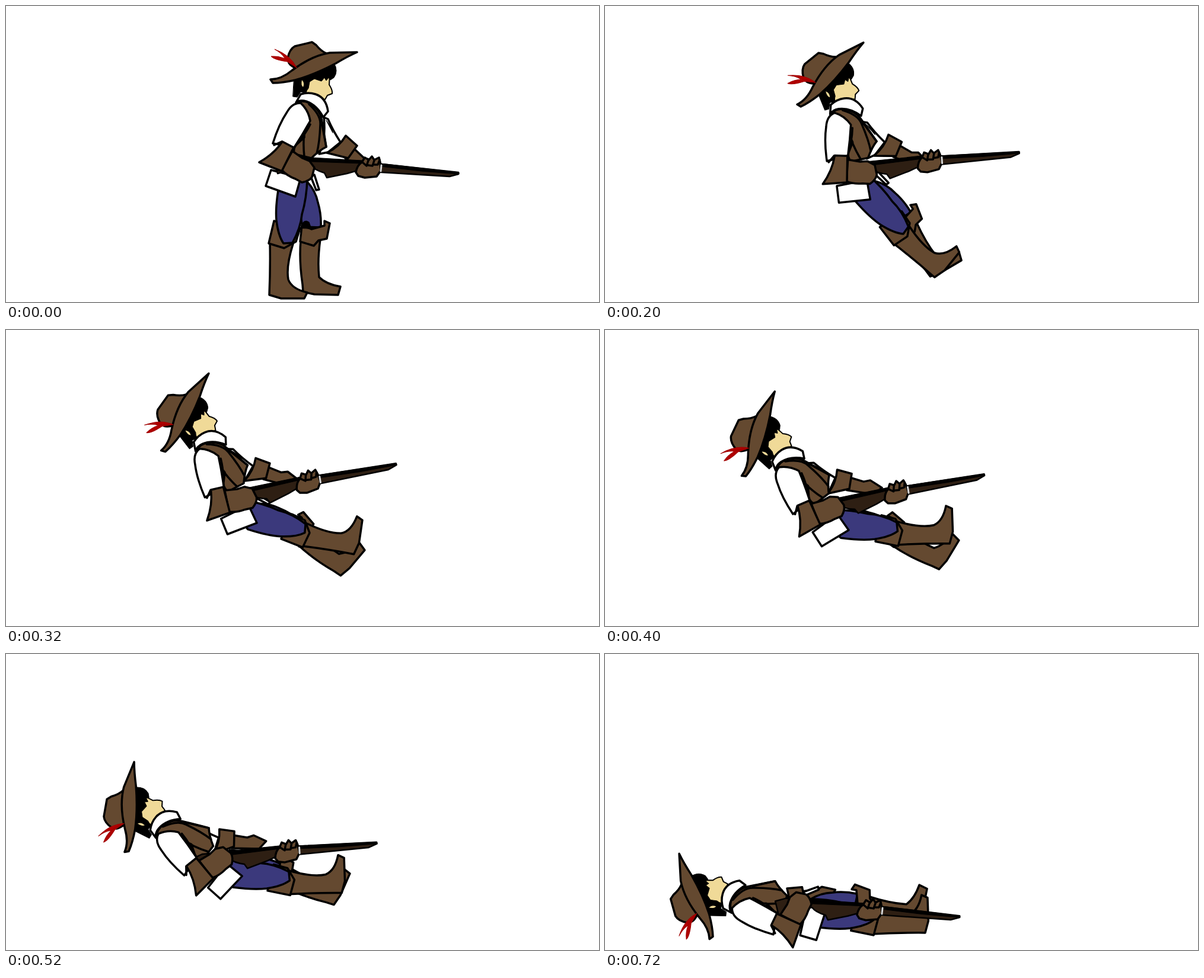
These frames come from a looping animation (1000 px wide and 500 px high, 1440 ms). An HTML page:

```html
<!DOCTYPE html>
<html lang="en">
<head>
<meta charset="utf-8">
<title>Falling musketeer</title>
<style>
html, body { margin: 0; width: 100%; height: 100%; overflow: hidden; background: #fff; }
svg { display: block; width: 1000px; height: 500px; }
path { stroke: #000; stroke-width: 3.5; stroke-linejoin: round; stroke-linecap: round; }
.brown { fill: #644930; }
.blue { fill: #3b397c; }
.white { fill: #fff; }
.skin { fill: #f0da98; stroke-width: 2; }
.wood { fill: #2e1f13; stroke-width: 2.5; }
.ink { fill: #000; stroke-width: 1; }
.line { fill: none; }
.red { fill: #b00000; stroke: #a00000; stroke-width: 1; }
.band { fill: none; stroke: #d8d8d8; stroke-width: 3; }
.bare { stroke: none; }
</style>
</head>
<body>
<svg id="stage" viewBox="0 0 1000 500"></svg>
<script>
const STEP = 40, MID = 9, LAST = 18, LOOP = 1440;

// Every part is rigid and moves evenly from its rest place to mid, then to end.
// Legs hang from the body by the hip, so they only turn.
const RIG = {
  body: { rest: [505, 285], mid: [400, 287], end: [335, 417], turn: [-46, -92] },
  farArm: { rest: [573, 219], mid: [402, 216], end: [307, 396], turn: [-24, -47] },
  gun: { rest: [632, 273], mid: [516, 249], end: [467, 433], turn: [-17, 0.5] },
  farLeg: { rest: [512, 292], turn: [-58, -80] },
  nearLeg: { rest: [485, 300], turn: [-92, -92] }
};

// Back to front: part, then class and outline of each shape at rest.
const LAYERS = [
  ["farArm", [
    ["white", "M536 188L543 191Q551 210 564 230L543 247L528 250Q540 225 536 188Z"],
    ["ink", "M540 193L549 206L551 214Z"],
    ["brown", "M586 240L604 257L615 260L627 280L610 284L590 270L572 257Z"],
    ["brown", "M573 219L592 236L577 257L541 248Q562 238 573 219Z"]]],
  ["farLeg", [
    ["blue", "M508 297Q522 312 526 332Q532 352 531 374L500 373L494 340Z"],
    ["brown", "M497 396Q494 430 500 470L501 483L520 487L560 488L564 474Q540 470 528 458Q525 430 530 394Z"],
    ["brown", "M499 370L515 377L537 371L537 363L546 367L541 393L527 396L519 405L496 398Z"],
    ["ink", "M497 375Q501 358 511 365L515 376Z"]]],
  ["nearLeg", [
    ["brown", "M445 398Q446 440 444 488L464 494L503 494L508 484Q482 478 476 462Q472 440 484 402Z"],
    ["brown", "M452 363L443 401L469 409L489 398L496 375L480 370Z"],
    ["blue", "M460 305Q454 340 456 362Q459 388 468 401L483 400Q497 375 499 352Q507 325 508 292L480 285Z"]]],
  ["body", [
    ["white", "M514 288L520 285L528 310L523 311Z"],
    ["white", "M447 277L438 304L488 322L497 290Z"],
    ["brown", "M491 163Q503 158 515 166Q530 177 532 190Q536 212 540 238Q528 244 515 257L486 250Q484 240 490 234L503 222L503 190Z"],
    ["line", "M511 166Q531 184 530 200Q529 230 524 249M505 196Q500 228 503 254M513 200Q502 222 486 236M533 200L540 238"],
    ["skin", "M511 124L546 116L545 133Q551 142 550 148L542 151L538 158L505 150Z"],
    ["white", "M489 163L497 149Q510 145 522 149Q540 155 543 178L535 188Q524 167 506 161Q496 158 489 163Z"],
    ["ink", "M486 118L553 96Q561 110 553 121L547 125L544 121L540 126L537 121L532 127L520 123L512 128L510 139L504 147L497 145L491 154L484 153Z"],
    ["skin bare", "M499 125Q504 130 501 137Q497 134 499 125Z"],
    ["brown", "M475 88Q478 73 487 68L516 61L523 66Q531 76 540 80L490 106Q480 101 477 96Z"],
    ["brown", "M446 124Q464 124 482 109Q515 84 546 79L592 78Q576 85 556 97Q520 116 488 125Q466 130 450 130Z"],
    ["red", "M490 104Q480 83 453 73Q464 79 470 88Q480 97 490 104ZM490 104Q472 83 447 85Q452 91 474 94Z"]]],
  ["gun", [
    ["wood", "M452 259L470 254L515 258L598 262L634 267L763 281L763 284L748 288L634 281L596 277L575 283L541 290L537 282Q520 277 514 269L482 276L458 283Z"],
    ["ink", "M488 254L515 256L600 261L632 266L764 281L764 284L700 279L632 271L600 266L516 263Z"],
    ["brown", "M590 281Q592 269 600 264L605 256L612 260L617 254L621 260L629 256L631 264L632 278L625 288L605 290L594 287Z"],
    ["line", "M601 264L608 270L611 261M611 269L618 270L621 261M621 268L627 268L630 260"],
    ["band", "M633 269L632 279"]]],
  ["body", [
    ["white", "M497 164Q483 163 474 179Q460 200 450 232L486 239Q501 216 513 194Q510 176 497 164Z"],
    ["brown", "M483 245L465 277Q474 287 488 292L499 298Q511 296 516 289L520 273L512 262L500 257Z"],
    ["brown", "M466 229L485 239L465 279L427 264Q452 250 466 229Z"],
    ["line", "M452 235L465 229"]]]
];

const stage = document.getElementById("stage");

function add(parent, tag, attrs) {
  const node = document.createElementNS("http://www.w3.org/2000/svg", tag);
  for (const key in attrs) node.setAttribute(key, attrs[key]);
  return parent.appendChild(node);
}

const groups = LAYERS.map(([name, shapes]) => {
  const node = add(stage, "g", {});
  shapes.forEach(([cls, d]) => add(node, "path", { class: cls, d }));
  return { node, part: RIG[name] };
});

const mix = (a, b, u) => a + (b - a) * u;

function blend(a, b, c, step) {
  return step < MID ? mix(a, b, step / MID) : mix(b, c, (step - MID) / (LAST - MID));
}

// Where a point of the body at rest lies at this step.
function onBody([px, py], step) {
  const [x, y, turn] = pose(RIG.body, step);
  const a = turn * Math.PI / 180, [bx, by] = RIG.body.rest;
  const dx = px - bx, dy = py - by;
  return [x + dx * Math.cos(a) - dy * Math.sin(a),
          y + dx * Math.sin(a) + dy * Math.cos(a)];
}

function pose({ rest, mid, end, turn }, step) {
  const place = mid
    ? rest.map((v, i) => blend(v, mid[i], end[i], step))
    : onBody(rest, step);
  return [...place, blend(0, ...turn, step)];
}

function draw(time) {
  const step = Math.min(LAST, Math.floor((time % LOOP) / STEP));
  for (const { node, part } of groups) {
    const [x, y, turn] = pose(part, step), [px, py] = part.rest;
    node.setAttribute("transform",
      `translate(${x} ${y}) rotate(${turn}) translate(${-px} ${-py})`);
  }
}

function tick() {
  draw(performance.now());
  requestAnimationFrame(tick);
}
tick();
</script>
</body>
</html>
```
